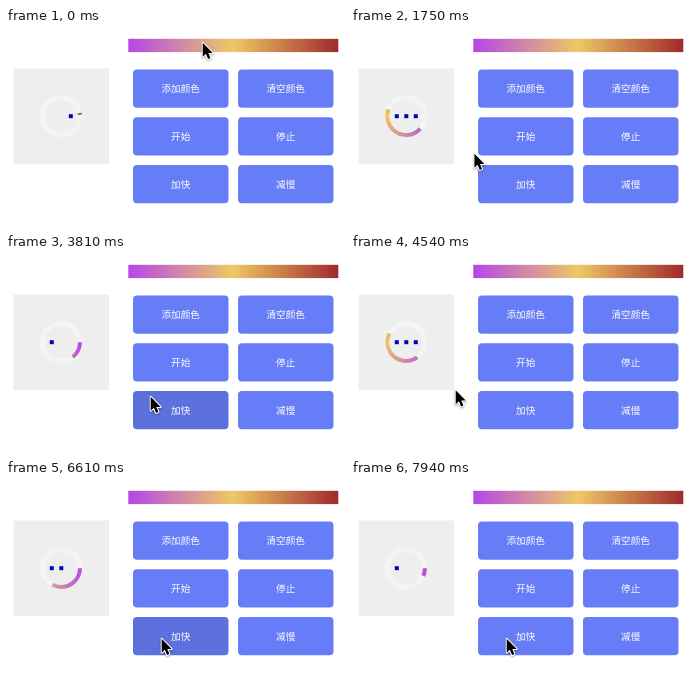
An HTML page with a canvas for the animation above (8000 ms loop, 339 px wide and 198 px high).

```html
<!DOCTYPE html>
<html lang="zh">
<head>
<meta charset="utf-8">
<style>
  html, body { margin: 0; width: 100%; height: 100%; overflow: hidden; background: #fff; }
  canvas { display: block; width: 339px; height: 198px; }
</style>
</head>
<body>
<canvas></canvas>
<script>
const W = 339, H = 198, LOOP = 8000, STEP = 146.9, STEP_OFFSET = 22;
const canvas = document.querySelector('canvas');
const ctx = canvas.getContext('2d');
const scale = window.devicePixelRatio || 1;
canvas.width = W * scale;
canvas.height = H * scale;
ctx.scale(scale, scale);

const COLORS = ['#b446e8', '#eec866', '#a02a2c'];
const LABELS = ['添加颜色', '清空颜色', '开始', '停止', '加快', '减慢'];
const RING = { x: 55.1, y: 88.2, r: 18.8 };
const FASTER = 4;

// Each press of "加快" adds to the spinner's turns per step.
const START_PHASE = .927, PACE = .0508;
const PRESSES = [{ step: 26, gain: .0092 }, { step: 45, gain: .0265 }];

const STOPS = [
  { step: 0, x: 196, y: 13 },
  { step: 7, x: 70, y: 102 },
  { step: 18, x: 192, y: 153 },
  { step: 26, x: 144, y: 141 },
  { step: 36, x: 64, y: 128 },
  { step: 45, x: 155, y: 157 }
];

function phaseAt(step) {
  return PRESSES.reduce(
    (phase, press) => phase + press.gain * Math.max(0, step - press.step),
    START_PHASE + PACE * step);
}

function pointerAt(step) {
  const next = STOPS.findIndex(stop => stop.step > step);
  if (next < 0) return STOPS[STOPS.length - 1];
  const a = STOPS[next - 1], b = STOPS[next];
  const f = (step - a.step) / (b.step - a.step);
  const eased = f * f * (3 - 2 * f);
  return { x: a.x + (b.x - a.x) * eased, y: a.y + (b.y - a.y) * eased };
}

function withStops(gradient) {
  COLORS.forEach((color, i) => gradient.addColorStop(i / 2, color));
  return gradient;
}

const barFill = withStops(ctx.createLinearGradient(122, 0, 332, 0));
const ringFill = withStops(ctx.createConicGradient(0, RING.x, RING.y));

function drawArc(from, to, width, style) {
  ctx.beginPath();
  ctx.arc(RING.x, RING.y, RING.r, from * 2 * Math.PI, to * 2 * Math.PI);
  ctx.lineWidth = width;
  ctx.strokeStyle = style;
  ctx.stroke();
}

function drawSpinner(phase) {
  ctx.fillStyle = '#eee';
  ctx.fillRect(7.5, 40.5, 95.5, 95.5);
  drawArc(0, 1, 5, '#f4f4f4');

  // The head runs one turn; the tail waits for half of it, then catches up.
  const head = (1 - Math.cos(Math.PI * (phase % 1))) / 2;
  const tail = Math.max(0, 2 * head - 1);
  drawArc(tail, head, 4, ringFill);

  ctx.fillStyle = '#0404b4';
  for (let i = 0; i < 3; i++) {
    if (head >= i / 5 && head < (i + 3) / 5) ctx.fillRect(43.8 + 9.5 * i, 86.2, 4, 4);
  }
}

function drawButton(label, i, pressed) {
  const x = 127 + (i % 2) * 105, y = 41.5 + Math.floor(i / 2) * 47.8;
  ctx.fillStyle = pressed ? '#5c71de' : '#667df7';
  ctx.beginPath();
  ctx.roundRect(x, y, 95.5, 38.2, 4);
  ctx.fill();
  ctx.fillStyle = '#fff';
  ctx.fillText(label, x + 47.7, y + 19.3);
}

const arrow = new Path2D('M0 0V14L3.2 11L5.4 16.2L7.7 15.2L5.6 10.2H10Z');

function drawPointer({ x, y }) {
  ctx.save();
  ctx.translate(x + .7, y + 1.8);
  ctx.lineWidth = 2;
  ctx.lineJoin = 'round';
  ctx.strokeStyle = '#fff';
  ctx.shadowColor = 'rgba(0,0,0,.35)';
  ctx.shadowBlur = 2 * scale;
  ctx.shadowOffsetY = scale;
  ctx.stroke(arrow);
  ctx.shadowColor = 'transparent';
  ctx.fillStyle = '#000';
  ctx.fill(arrow);
  ctx.restore();
}

function draw(time) {
  const step = Math.floor((time % LOOP + STEP_OFFSET) / STEP);
  const pressed = PRESSES.some(press => Math.abs(step - press.step) <= 1);

  ctx.fillStyle = '#fff';
  ctx.fillRect(0, 0, W, H);
  ctx.fillStyle = barFill;
  ctx.fillRect(122.3, 10.8, 210, 13.3);
  drawSpinner(phaseAt(step));

  ctx.font = '9.6px "Noto Sans CJK SC", "Noto Sans CJK", sans-serif';
  ctx.textAlign = 'center';
  ctx.textBaseline = 'middle';
  LABELS.forEach((label, i) => drawButton(label, i, pressed && i === FASTER));
  drawPointer(pointerAt(step));
}

const start = performance.now();
function tick() {
  draw(performance.now() - start);
  requestAnimationFrame(tick);
}
tick();
</script>
</body>
</html>
```
